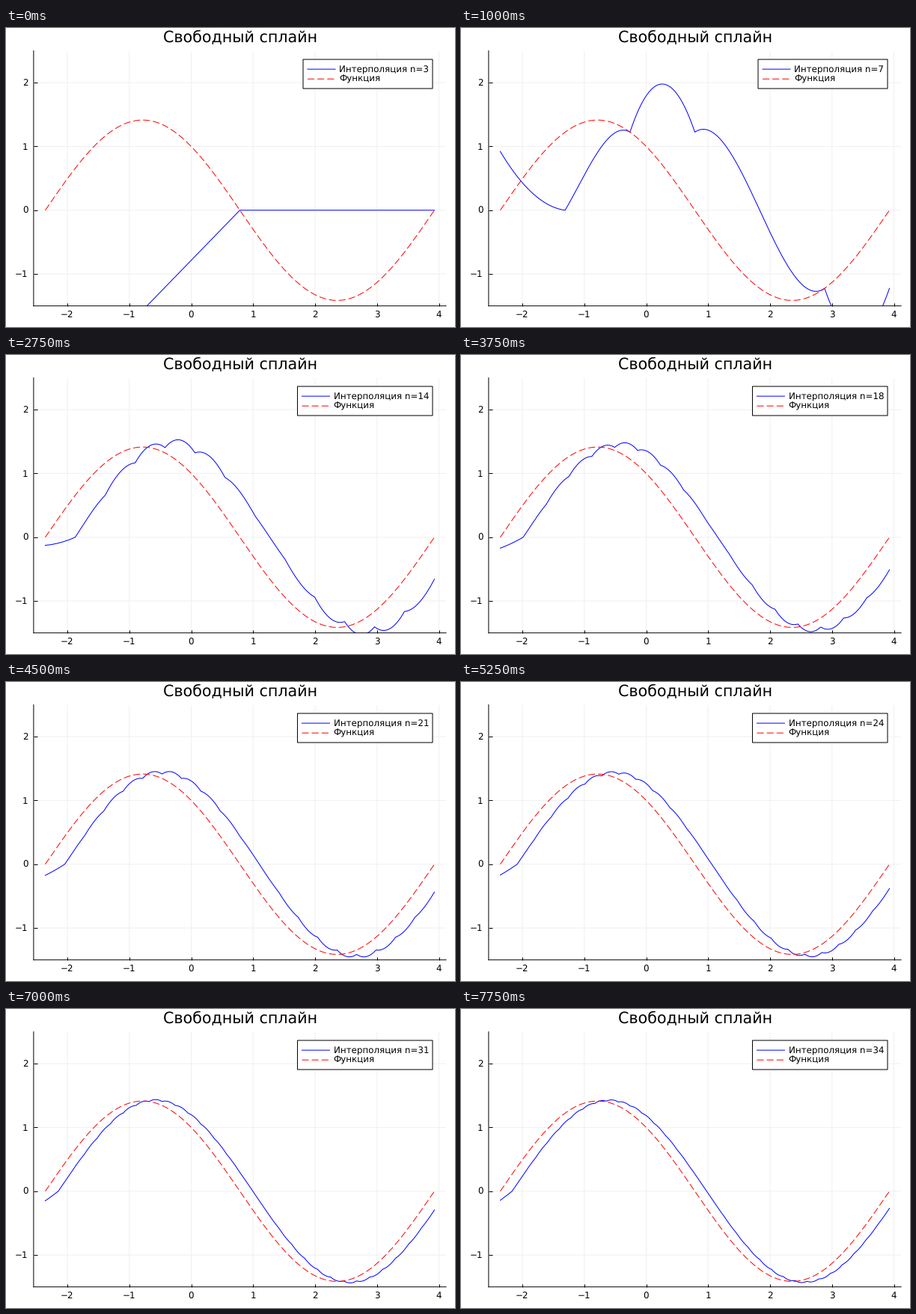
These frames come from a looping animation (600x400 px, 8000 ms). A matplotlib script:

```python
import numpy as np
import matplotlib.pyplot as plt
from matplotlib.animation import FuncAnimation
from matplotlib.patches import Rectangle

DPI = 100
PX = 72 / DPI                     # one pixel in points
FRAMES, INTERVAL = 32, 250
START, END = -3 * np.pi / 4, 5 * np.pi / 4
LEFT, RIGHT, TOP, BOTTOM = 36.9, 588.1, 30.5, 371.75
SMALL, LARGE = 11.84, 20.7        # font sizes in pixels
DIGIT = 0.636 * SMALL

plt.rcParams.update({
    "font.family": "DejaVu Sans",
    "text.hinting": "none",
    "path.snap": False,
    "lines.scale_dashes": False,
    "lines.linewidth": PX,
})
BLUE = dict(color="blue")
RED = dict(color="red", linestyle=(0, (9.1 * PX, 4.05 * PX)),
           dash_capstyle="butt")


def func(x):
    return np.cos(x) - np.sin(x)


def moments(f, h):
    """Second derivatives from the tridiagonal system, first row left empty."""
    size = len(f) - 1
    matrix = 4 * np.eye(size) + np.eye(size, k=1) + np.eye(size, k=-1)
    rhs = np.zeros(size)
    rhs[1:] = 24 / h**2 * np.diff(f, 2)
    return np.linalg.solve(matrix, rhs)


def spline(n, x):
    """Badly scaled cubic spline whose values lag one knot behind."""
    h = (END - START) / (n - 1)
    f = func(START + h * np.arange(n))
    m = moments(f, h)
    seg = np.clip(((x - START) / h).astype(int), 0, n - 2)
    t = x - START - seg * h
    prev = np.maximum(seg - 1, 0)
    s = h - t
    y = (f[prev] * s + f[seg] * t) / h
    y += m[prev] * (s**3 / h - h * s) / 6 + m[seg] * (t**3 / h - h * t) / 6
    first = f[0] - (1 - np.pi / 4 * m[0]) * s + m[0] / 2 * s**2
    return np.where(seg == 0, first, y)


fig = plt.figure(figsize=(6, 4), dpi=DPI, facecolor="white")
ax = fig.add_axes([LEFT / 600, 1 - BOTTOM / 400,
                   (RIGHT - LEFT) / 600, (BOTTOM - TOP) / 400])
pad = 0.03 * (END - START)
ax.set(xlim=(START - pad, END + pad), ylim=(-1.5, 2.5),
       xticks=range(-2, 5), yticks=range(-1, 3))
ax.tick_params(direction="in", length=4.5 * PX, width=PX,
               labelbottom=False, labelleft=False)
ax.grid(color="#f0f0f0", linewidth=PX)
ax.set_axisbelow(True)
for side, spine in ax.spines.items():
    spine.set_visible(side in ("left", "bottom"))
    spine.set_linewidth(PX)
    spine.set_snap(False)
for axis in (ax.xaxis, ax.yaxis):
    for tick in axis.get_major_ticks():
        tick.tick1line.set_snap(False)
        tick.gridline.set_snap(False)

# Overlay in stage pixels for the text and the legend
top = fig.add_axes([0, 0, 1, 1])
top.set(xlim=(0, 600), ylim=(400, 0))
top.axis("off")


def put(x, y, text, size=SMALL, ha="left"):
    return top.text(x, y, text, fontsize=size * PX, ha=ha, va="baseline")


put((LEFT + RIGHT) / 2 + 1, 19, "Свободный сплайн", LARGE, "center")
for v in range(-2, 5):
    x = LEFT + (v - START + pad) / (END - START + 2 * pad) * (RIGHT - LEFT)
    put(x, 387.4, str(v).replace("-", "−"), ha="center")
for v in range(-1, 3):
    y = BOTTOM - (v + 1.5) / 4 * (BOTTOM - TOP)
    put(29.6, y + 4.1, str(v).replace("-", "−"), ha="right")

xs = np.linspace(START, END, 1001)
curve, = ax.plot(xs, xs, **BLUE)
ax.plot(xs, func(xs), **RED)

box = top.add_patch(Rectangle((397, 42), 173, 39, facecolor="white",
                              edgecolor="black", linewidth=PX, snap=False))
key_blue, = top.plot([], [], **BLUE)
key_red, = top.plot([], [], **RED)
label = put(445, 59, "")
label_func = put(445, 72, "Функция")


def update(i):
    n = 3 + i
    curve.set_ydata(spline(n, xs))
    shift = DIGIT * (len(str(n)) - 1)
    box.set_x(397 - shift)
    box.set_width(173 + shift)
    for key, y in ((key_blue, 55.1), (key_red, 68.2)):
        key.set_data([403 - shift, 440 - shift], [y, y])
    label.set_text(f"Интерполяция n={n}")
    for text in (label, label_func):
        text.set_x(445.2 - shift)
    return curve, box, key_blue, key_red, label, label_func


anim = FuncAnimation(fig, update, frames=FRAMES, interval=INTERVAL,
                     repeat=True, repeat_delay=0, blit=False)
plt.show()
```
